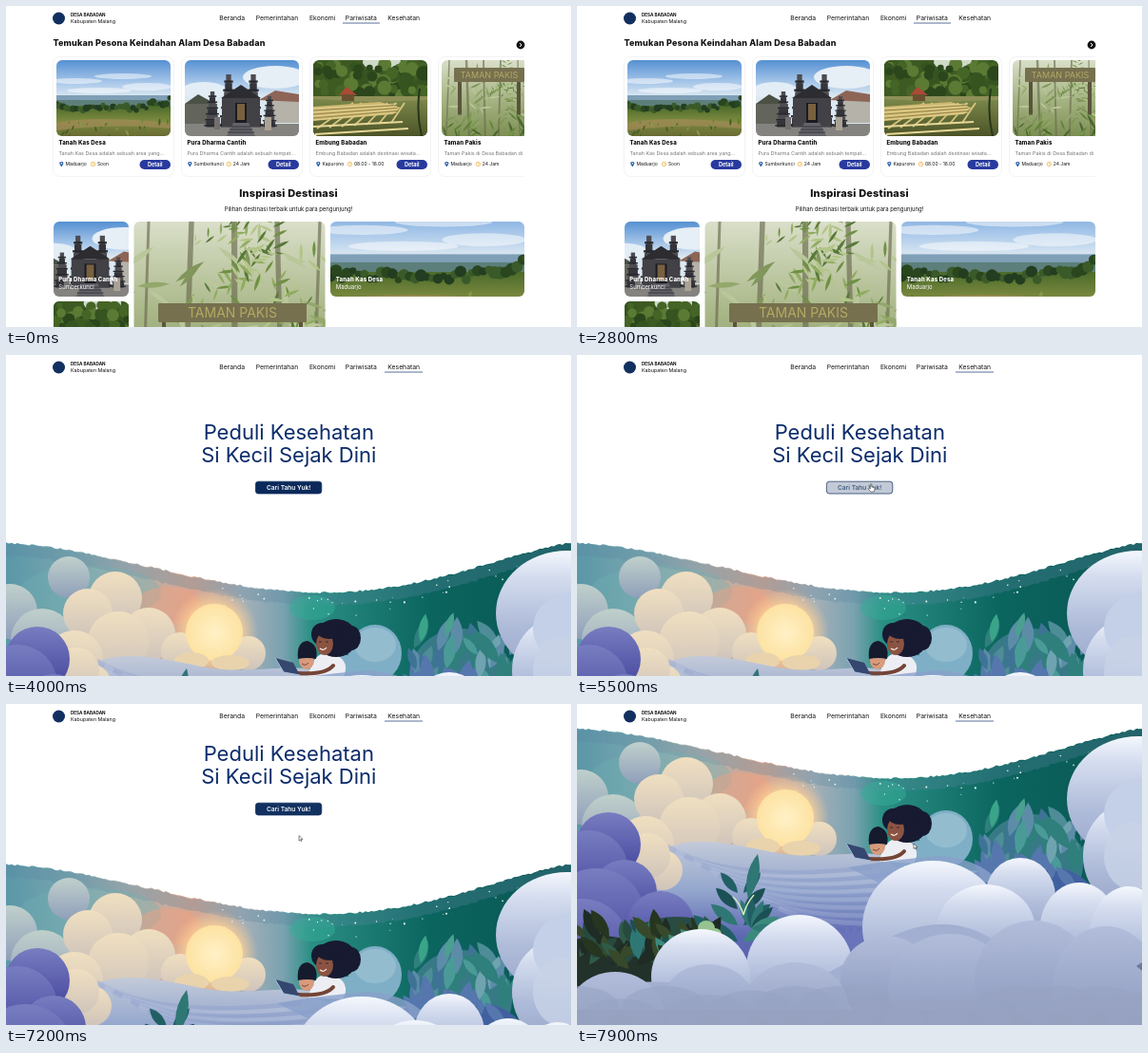
An HTML page for the animation above (8 s loop, 594 by 338 pixels).

```html
<!DOCTYPE html>
<html lang="id">
<head>
<meta charset="utf-8">
<title>Desa Babadan</title>
<style>
html, body { margin: 0; width: 100%; height: 100%; overflow: hidden; background: #fff; }
svg { display: block; }
text { font-family: Inter, "Open Sans", sans-serif; fill: #111; }
.b { font-weight: 700; }
.x { font-weight: 800; letter-spacing: .16px; }
.m { text-anchor: middle; }
.w { fill: #fff; }
.navy { fill: #0c2c6b; }
</style>
</head>
<body>
<svg id="stage" width="594" height="338" viewBox="0 0 594 338">
<defs>
  <linearGradient id="air" x2="0" y2="1"><stop stop-color="#5590d2"/><stop offset=".3" stop-color="#a9c8ea"/><stop offset=".48" stop-color="#dce8f1"/></linearGradient>
  <linearGradient id="grass" x2="0" y2="1"><stop stop-color="#4b6a2b"/><stop offset=".5" stop-color="#7c8a3f"/><stop offset="1" stop-color="#6a6b34"/></linearGradient>
  <linearGradient id="pond" x2="0" y2="1"><stop stop-color="#7d8a4b"/><stop offset="1" stop-color="#4c5428"/></linearGradient>
  <linearGradient id="wood" x2="0" y2="1"><stop stop-color="#d9dfc9"/><stop offset=".5" stop-color="#a7b585"/><stop offset="1" stop-color="#7d8f54"/></linearGradient>
  <linearGradient id="sky"><stop stop-color="#5a97a8"/><stop offset=".12" stop-color="#7ba7b0"/><stop offset=".22" stop-color="#b0b0ac"/><stop offset=".33" stop-color="#d9a690"/><stop offset=".42" stop-color="#a5b0b8"/><stop offset=".49" stop-color="#7aa2b0"/><stop offset=".54" stop-color="#2a8f84"/><stop offset=".75" stop-color="#0b655f"/><stop offset="1" stop-color="#0a5553"/></linearGradient>
  <linearGradient id="mist" x2="0" y2="1"><stop stop-color="#c3cad9"/><stop offset=".22" stop-color="#93a6cd"/><stop offset=".42" stop-color="#5d68b2"/><stop offset="1" stop-color="#4a50a0"/></linearGradient>
  <linearGradient id="cloud" x2="0" y2="1"><stop stop-color="#f4f7fd"/><stop offset=".2" stop-color="#d5ddef"/><stop offset=".6" stop-color="#aebbd9"/><stop offset="1" stop-color="#98a5c8"/></linearGradient>
  <linearGradient id="dusk" x2="0" y2="1"><stop stop-color="#b2bddb"/><stop offset=".5" stop-color="#9ca8c9"/><stop offset="1" stop-color="#8e98b8"/></linearGradient>
  <linearGradient id="cream" x2="0" y2="1"><stop stop-color="#f0dfc0"/><stop offset="1" stop-color="#cfc4bb"/></linearGradient>
  <linearGradient id="haze" x2="0" y2="1"><stop stop-color="#c0d0cb"/><stop offset="1" stop-color="#8f9fba"/></linearGradient>
  <linearGradient id="plum" x2="0" y2="1"><stop stop-color="#787dc0"/><stop offset="1" stop-color="#42429b"/></linearGradient>
  <radialGradient id="glow"><stop offset=".5" stop-color="#ffd99a"/><stop offset="1" stop-color="#ffc890" stop-opacity="0"/></radialGradient>
  <radialGradient id="sun"><stop stop-color="#fff1c6"/><stop offset="1" stop-color="#fde2a2"/></radialGradient>
  <clipPath id="row"><rect x="45" y="50" width="500" height="135"/></clipPath>
</defs>
<g id="travel"></g>
<g id="health">
  <rect width="594" height="338" fill="#fff"/>
  <g id="scroll">
    <g id="art" transform="translate(0 172)"></g>
    <g class="m" font-size="22">
      <text class="navy" x="297.3" y="88.7">Peduli Kesehatan</text>
      <text class="navy" x="297.3" y="113">Si Kecil Sejak Dini</text>
    </g>
    <rect id="btn" x="262.4" y="133.2" width="69.4" height="12.8" rx="3" stroke="#0b2a5b" stroke-width=".7"/>
    <text id="cta" class="m" x="297.2" y="141.9" font-size="6.6" font-weight="600">Cari Tahu Yuk!</text>
  </g>
</g>
<g id="head"></g>
<g id="cursor" stroke="#333" stroke-width=".6" stroke-linejoin="round" fill="#fff">
  <path id="arrow" d="M0 0V5.4L1.3 4.2 2.2 6 3 5.6 2.2 3.9H4Z"/>
  <path id="hand" d="M0 0Q.8-.8 1.5 0V3L4 3.5Q5 4 4.8 5.2L4 8H.4L-2.2 4.8Q-2 3.6-.9 4.2L0 5Z"/>
</g>
</svg>
<script>
const $ = id => document.getElementById(id);
const fillIn = (id, ...parts) => $(id).innerHTML = parts.flat(9).join('');
let seed = 7;
const rnd = (a, b) => a + (b - a) * ((seed = seed * 16807 % 2147483647) / 2147483647);
const times = (n, f) => Array.from({length: n}, (_, i) => f(i));

const text = (x, y, size, s, cls = '', fill) =>
  `<text x="${x}" y="${y}" font-size="${size}" class="${cls}"${fill ? ` style="fill:${fill}"` : ''}>${s}</text>`;
const rect = (x, y, w, h, fill, rx = 0) => `<rect x="${x}" y="${y}" width="${w}" height="${h}" rx="${rx}" fill="${fill}"/>`;
const path = (d, fill, extra = '') => `<path d="${d}" fill="${fill}" ${extra}/>`;
const line = (d, color, w, extra = '') => path(d, 'none', `stroke="${color}" stroke-width="${w}" ${extra}`);
const oval = (x, y, rx, ry, fill, extra = '') => `<ellipse cx="${x}" cy="${y}" rx="${rx}" ry="${ry}" fill="${fill}" ${extra}/>`;
const disc = (x, y, r, fill, extra) => oval(x, y, r, r, fill, extra);
const discs = (fill, list) => list.map(([x, y, r, ry = r]) => oval(x, y, r, ry, fill));
const leaf = (x, y, len, deg, fill, fat = .3) =>
  path(`M0 0Q${len * fat} ${-len * .5} 0 ${-len}Q${-len * fat} ${-len * .5} 0 0`, fill, `transform="translate(${x} ${y}) rotate(${deg})"`);
const pick = list => list[Math.floor(rnd(0, list.length))];

// Photo scenes, drawn in a 120 x 80 box
const scenes = {
  hill: () => [
    rect(0, 0, 120, 80, 'url(#air)'),
    [[20, 22, 28, 3], [70, 17, 30, 3], [95, 28, 26, 4], [45, 32, 34, 3]].map(c => oval(...c, '#fff', 'opacity=".5"')),
    rect(0, 37, 120, 9, '#7f9fb6'), rect(0, 42, 120, 8, '#5d7f7b'),
    rect(0, 48, 120, 32, 'url(#grass)'),
    times(36, i => disc(i * 3.5, rnd(47, 53) - (i > 25 ? (i - 25) * .8 : 0), rnd(2, 4), pick(['#29461f', '#3a5a29', '#233d20']))),
    path('M0 66Q40 58 120 66V72Q60 66 0 74Z', '#a38a58', 'opacity=".7"'),
    times(28, () => leaf(rnd(0, 120), rnd(66, 82), rnd(3, 8), rnd(-40, 40), pick(['#5f7d2c', '#87994a', '#445f24'])))
  ],
  temple: () => [
    rect(0, 0, 120, 80, 'url(#air)'),
    oval(95, 18, 34, 12, '#e6eef6'), oval(20, 32, 24, 9, '#e3edf6'),
    rect(88, 40, 32, 26, '#b4b2a9'), path('M78 42L95 32 120 36V44Z', '#8d6557'),
    rect(0, 46, 34, 24, '#63655d'), path('M0 46L14 36 32 46Z', '#4b5145'),
    rect(0, 67, 120, 13, '#85837f'),
    [[46, 15, 12], [72, 15, 12], [29, 33, 10], [89, 38, 9]].map(([x, y, w]) => times(6, i => {
      const h = (70 - y) / 6, half = w * (.22 + i * .09);
      return rect(x - half, y + i * h, half * 2, h + .5, i % 2 ? '#34343a' : '#4d4c50') +
             rect(x - half - 2, y + i * h + h * .7, half * 2 + 4, h * .25, '#27282d');
    })),
    rect(39, 40, 40, 30, '#424146'), path('M38 40L59 26 80 40Z', '#2c2c31'),
    rect(53, 45, 12, 25, '#191b21'), rect(55, 46, 8, 17, '#77613f'),
    path('M44 80L51 66H67L74 80Z', '#64636a'),
    line('M45 76H73M47 73H71M49 70H69', '#35363c', 1),
    rect(84, 60, 7, 14, '#aaa294'), rect(31, 60, 6, 13, '#726f6e')
  ],
  lake: () => [
    rect(0, 0, 120, 80, '#3d5a22'),
    oval(72, 2, 20, 9, '#cfd9c7'),
    times(75, () => disc(rnd(0, 120), rnd(4, 38), rnd(3, 8), pick(['#2b461b', '#456527', '#5b7a34', '#365420']))),
    rect(0, 39, 120, 41, 'url(#pond)'),
    path('M0 38H120V42L60 44 0 41Z', '#8e9058'),
    times(7, i => line(`M${4 + i * 13} ${72 - i}L${42 + i * 9} 45`, '#d9c57e', 1.8)),
    path('M0 49L70 44 92 50 84 57 0 64Z', '#cdb771'),
    times(7, i => line(`M0 ${51 + i * 2}L88 ${46 + i * 1.5}`, i % 2 ? '#8d7a42' : '#eadb9b', .8)),
    line('M0 70L94 65M2 78L100 72', '#e7d797', 2.2),
    path('M27 37L35 28 46 37Z', '#ad4a35'), rect(30, 36, 13, 7, '#69512f'),
    line('M112 30Q108 55 114 80', '#26351b', 2)
  ],
  fern: () => [
    rect(0, 0, 120, 80, 'url(#wood)'),
    times(7, i => line(`M${8 + i * 18} 0l${rnd(-4, 4)} 80`, '#6b6a4f', rnd(1, 2.6), 'opacity=".65"')),
    times(50, () => leaf(rnd(0, 120), rnd(15, 75), rnd(8, 16), rnd(-130, 130), pick(['#b9c79a', '#94a76c', '#80965a']), .16)),
    times(11, i => {
      const x = rnd(60, 95), y = rnd(8, 38);
      const deg = i * 33;
      return times(12, j => leaf(x + Math.sin(deg / 57.3) * j * 3, y - Math.cos(deg / 57.3) * j * 3 + j * j * .12, 8 - j * .4,
        deg + (j % 2 ? 65 : -65), pick(['#6f9043', '#91ab61', '#59793a', '#b3c589']), .18));
    }),
    times(34, () => leaf(rnd(0, 120), rnd(62, 86), rnd(8, 20), rnd(-60, 60), pick(['#61813a', '#7c9950', '#4b6830']), .16))
  ]
};

// A rounded picture cropped to cover its box
const photo = (name, x, y, w, h) => {
  const id = 'c' + x + y, k = Math.max(w / 120, h / 80);
  return `<clipPath id="${id}">${rect(x, y, w, h, '#000', 6)}</clipPath><g clip-path="url(#${id})">
    <g transform="translate(${x + (w - 120 * k) / 2} ${y + (h - 80 * k) / 2}) scale(${k})">${scenes[name]().flat(9).join('')}</g></g>`;
};
const sign = (x, y, w, h, size) => rect(x + 4, y, 4, h * 3.3, '#5b543d') + rect(x + w - 8, y, 4, h * 3.3, '#5b543d') +
  rect(x, y, w, h, '#76704f', 1) + text(x + w / 2, y + h / 2 + size * .36, size, 'TAMAN PAKIS', 'm', '#b5a964');

const card = ([scene, title, note, place, hours, gap], i) => {
  const x = 53 + i * 135;
  return [
    `<rect x="${x - 3.5}" y="53.5" width="127" height="126" rx="7" fill="#fff" stroke="#f3f3f4"/>`,
    photo(scene, x, 57, 120, 80),
    scene == 'fern' ? sign(x + 13, 65, 74, 15, 9) : '',
    text(x + 2.4, 146, 6, title, 'x'),
    text(x + 2.4, 157, 5.4, note, '', '#777'),
    path(`M${x + 5.3} 169.5Q${x + 1} 164 ${x + 5.3} 164T${x + 5.3} 169.5`, '#2d63a8'), disc(x + 5.3, 165.8, .8, '#fff'),
    text(x + 9.4, 168.4, 5, place),
    disc(x + gap, 166.5, 2.2, '#fff', 'stroke="#efb23f" stroke-width=".8"'),
    line(`M${x + gap} 165.2V166.6H${x + gap + 1.2}`, '#efb23f', .6),
    text(x + gap + 4.4, 168.4, 5, hours),
    rect(x + 87.5, 162, 32.5, 10, '#293a9e', 5), text(x + 103.7, 168.8, 5.5, 'Detail', 'b m w')
  ];
};
const caption = (x, a, b) => text(x, 289.7, 6, a, 'x w') + text(x, 298, 6, b, 'w');

fillIn('travel',
  rect(0, 0, 594, 338, '#fff'),
  text(49.5, 42.3, 9, 'Temukan Pesona Keindahan Alam Desa Babadan', 'x'),
  disc(541, 41, 4.4, '#111'), line('M540 39L542 41 540 43', '#fff', 1),
  '<g clip-path="url(#row)">',
  [
    ['hill', 'Tanah Kas Desa', 'Tanah Kas Desa adalah sebuah area yang...', 'Maduarjo', 'Soon', 38.5],
    ['temple', 'Pura Dharma Cantih', 'Pura Dharma Cantih adalah sebuah tempat...', 'Sumberkunci', '24 Jam', 46.3],
    ['lake', 'Embung Babadan', 'Embung Babadan adalah destinasi wisata...', 'Kapurono', '08.00 - 18.00', 38.5],
    ['fern', 'Taman Pakis', 'Taman Pakis di Desa Babadan di', 'Maduarjo', '24 Jam', 38.3]
  ].map(card), '</g>',
  text(297, 201.3, 11, 'Inspirasi Destinasi', 'x m'),
  text(297, 216, 5.95, 'Pilihan destinasi terbaik untuk para pengunjung!', 'm'),
  photo('temple', 50, 227, 79, 79), photo('lake', 50, 311, 79, 79),
  photo('fern', 134.5, 227, 201, 200), sign(160, 313, 156, 20, 14),
  photo('hill', 341, 227, 204, 79),
  caption(55.3, 'Pura Dharma Cantih', 'Sumberkunci'), caption(346.8, 'Tanah Kas Desa', 'Maduarjo')
);

const tabs = [[224.3, 'Beranda'], [262.8, 'Pemerintahan'], [319, 'Ekonomi'], [356.8, 'Pariwisata'], [401.3, 'Kesehatan']];
fillIn('head',
  rect(0, 0, 594, 25.5, '#fff'),
  disc(55.5, 13, 6.5, '#12305f'),
  text(68, 11, 4.6, 'DESA BABADAN', 'b'), text(68, 18, 5.3, 'Kabupaten Malang'),
  tabs.map(([x, s]) => text(x, 15.2, 6.8, s)),
  '<g id="tab1">', line('M354 18H393', '#4a6190', .9), '</g>',
  '<g id="tab2">', line('M398 18H438', '#4a6190', .9), '</g>'
);

// Painted night scene
const rim = x => 26 + 52 * Math.abs(Math.sin(Math.PI * (x / 594) ** 1.2)) ** 1.3;
const edge = times(199, i => `${i * 3} ${(rim(i * 3) + rnd(-1, 1)).toFixed(1)}`).join('L');
const teal = ['#4e8d97', '#6fa3b0', '#5c8ca8', '#4a9b98', '#2f7f7c', '#3f7396'];
const green = ['#215f65', '#2f7774', '#1b5054', '#3c8a7d'];
const olive = ['#263520', '#37492a', '#1e2c25', '#2f5a48', '#264a3e'];
fillIn('art',
  path(`M${edge}V380H0Z`, 'url(#sky)'),
  line(`M${edge}`, '#5b85a0', 12, 'opacity=".3" transform="translate(0 7)"'),
  oval(88, 78, 75, 28, '#6fb0b0', 'opacity=".35"'), oval(170, 92, 34, 20, '#f0a17f', 'opacity=".45"'),
  oval(322, 94, 24, 13, '#35ad98', 'opacity=".5"'),
  times(34, () => { const x = rnd(225, 540); return disc(x, rim(x) + rnd(5, 26), rnd(.4, 1.1), '#eaf6ee'); }),
  disc(219, 120, 46, 'url(#glow)'),
  discs('url(#haze)', [[66, 62, 22], [4, 98, 29], [38, 128, 33]]),
  discs('url(#cream)', [[115, 84, 28], [86, 100, 26], [150, 122, 28], [118, 130, 32], [183, 140, 20], [255, 142, 18], [72, 148, 30]]),
  disc(219, 120, 30, 'url(#sun)'),
  discs('#e9d3ad', [[195, 150, 18, 9], [236, 152, 20, 8]]),
  path('M70 165C110 135 150 145 205 156S300 148 345 165 440 165 470 195V380H40Z', 'url(#mist)'),
  times(14, i => line(`M${95 + i * 9} ${150 + i * 5}Q${160 + i * 8} ${190 + i * 4} ${310 + i * 9} ${172 + i * 4}`, i % 2 ? '#ccd5e8' : '#7386bd', 5, 'opacity=".22"')),
  discs('#7fafc6', [[388, 142, 28, 30], [362, 160, 38, 16]]), oval(388, 133, 22, 18, '#93bdcf'),
  oval(478, 168, 54, 52, '#377a86'), oval(470, 205, 75, 38, '#41609f'),
  times(55, () => { const y = rnd(135, 200); return leaf(rnd(425, 530), y, rnd(22, 45), rnd(-42, 42), y > 180 ? '#5577ad' : pick(teal), .34); }),
  leaf(436, 130, 30, 10, '#3aa489'), leaf(462, 125, 27, 18, '#4ba08f'),
  // mother and child reading
  path('M318 166Q322 140 342 141 364 150 354 168Z', '#eceef4'),
  discs('#171a30', [[347, 126, 22, 20], [332, 122, 11, 12], [363, 126, 10, 13]]),
  oval(335, 132, 9, 12, '#8b5442'), oval(340, 119, 13, 8, '#171a30'),
  line('M330 137Q334 140 337 136', '#fff0e4', 1.2), line('M329 130h3M336 130h3', '#2a1d27', .8),
  line('M344 155Q336 165 307 163', '#744536', 4, 'stroke-linecap="round"'),
  oval(316, 150, 8, 9, '#d79b7c'), path('M307 148Q305 130 317 129 329 133 326 148 317 146 307 148', '#151a2d'),
  line('M311 153Q315 156 318 152', '#6c3a35', .9),
  path('M283 147L302 152 309 165 292 162Z', '#35466f'), line('M283 147L292 162 309 165', '#a8c0dc', 1),
  path('M285 172Q330 164 380 160 420 162 442 185L350 205Z', '#8aa0cb', 'opacity=".8"'),
  // left bushes and plants
  discs('url(#cream)', [[90, 175, 21], [74, 160, 24]]),
  discs('url(#plum)', [[33, 148, 34], [12, 175, 42], [50, 198, 34], [20, 225, 52], [88, 232, 35], [5, 255, 50]]),
  times(4, i => [-1, 1].map(s => leaf(172 + s * 3, 250 - i * 17, 40 - i * 4, s * (58 - i * 6), pick(green), .34))),
  leaf(180, 205, 48, 12, '#2f7774', .25),
  times(6, i => leaf(183, 236, 32, i * 22 - 20, pick(green), .28)),
  line('M175 222Q171 209 164 203M175 222Q178 210 186 201', '#d4edc0', 1.5),
  oval(25, 290, 65, 46, '#22312a'), oval(105, 250, 52, 26, '#284b42'),
  times(60, i => leaf(i * 2.6, rnd(245, 280), rnd(22, 38), rnd(-50, 55), pick(i > 22 ? [...green, ...olive] : olive), .36)),
  discs('#96c38f', [[136, 236, 9, 8], [145, 242, 7, 6]]),
  times(5, i => leaf(290, 262, 30, i * 18 - 50, '#6a74ba')),
  // clouds in front
  discs('url(#cloud)', [[590, 100, 75, 66], [582, 160, 50, 56]]),
  oval(594, 116, 40, 38, '#c3d0e7'), oval(584, 160, 30, 36, '#c9d4e8', 'opacity=".8"'),
  discs('url(#cloud)', [[466, 203, 37, 41], [528, 240, 42, 52], [580, 248, 42, 56], [374, 235, 74, 70], [430, 238, 52, 48], [234, 278, 56, 56], [130, 287, 52, 50]]),
  path('M0 300Q80 285 150 300T300 262 440 250 594 250V410H0Z', '#a3afd0'),
  discs('url(#dusk)', [[325, 290, 48, 46], [392, 300, 65, 58], [480, 290, 62, 62], [556, 300, 56, 66], [230, 318, 55, 46], [138, 318, 50, 44], [40, 336, 54, 54]]),
  rect(0, 322, 594, 90, '#939dbd'),
  times(14, i => oval(i * 46, rnd(318, 334), 44, 22, '#98a3c3', 'opacity=".6"')),
  path('M588 276L594 272V281Z', '#6d789b')
);

const clamp = x => Math.max(0, Math.min(1, x));
const easeOut = x => 1 - (1 - clamp(x)) ** 2;
const along = (t, pts) => {
  const i = pts.findIndex(p => p[0] > t);
  if (i == 0) return pts[0][1];
  if (i < 0) return pts[pts.length - 1][1];
  const [[a, u], [b, v]] = [pts[i - 1], pts[i]];
  return u + (v - u) * (t - a) / (b - a);
};
const mix = (a, b, k) => `rgb(${a.map((v, i) => Math.round(v + (b[i] - v) * k))})`;
const navy = [11, 42, 91], white = [255, 255, 255];

function draw(t) {
  const page = 1 - (1 - clamp((t - 3.1) / .8)) ** 3;
  $('health').setAttribute('opacity', page);
  $('tab1').setAttribute('opacity', 1 - page);
  $('tab2').setAttribute('opacity', page);

  const y = along(t, [[6.7, 0], [7, 11], [7.2, 29], [7.4, 57], [7.6, 93], [7.75, 130], [7.9, 172], [8, 201]]);
  $('scroll').setAttribute('transform', `translate(0 ${-y})`);

  const hover = easeOut((t - 5.35) / .3) - easeOut((t - 6.95) / .3);
  $('btn').setAttribute('fill', mix(navy, white, hover));
  $('cta').style.fill = mix(white, navy, hover);

  const over = t >= 5.4 && t < 7;
  const cx = along(t, [[4.7, 372], [5.4, 308.3], [7.6, 308], [7.9, 354]]);
  const cy = along(t, [[4.7, 88], [5.4, 136], [6.9, 136], [7, 138.6], [7.6, 138.6], [7.9, 147]]);
  $('cursor').setAttribute('transform', `translate(${cx} ${cy})`);
  $('cursor').setAttribute('opacity', +(t >= 4.7));
  $('hand').setAttribute('opacity', +over);
  $('arrow').setAttribute('opacity', +!over);
}

// The picture advances ten times a second
let last = -1;
function tick() {
  const step = Math.floor(performance.now() % 8000 / 100);
  if (step != last) draw((last = step) / 10);
  requestAnimationFrame(tick);
}
tick();
</script>
</body>
</html>
```
